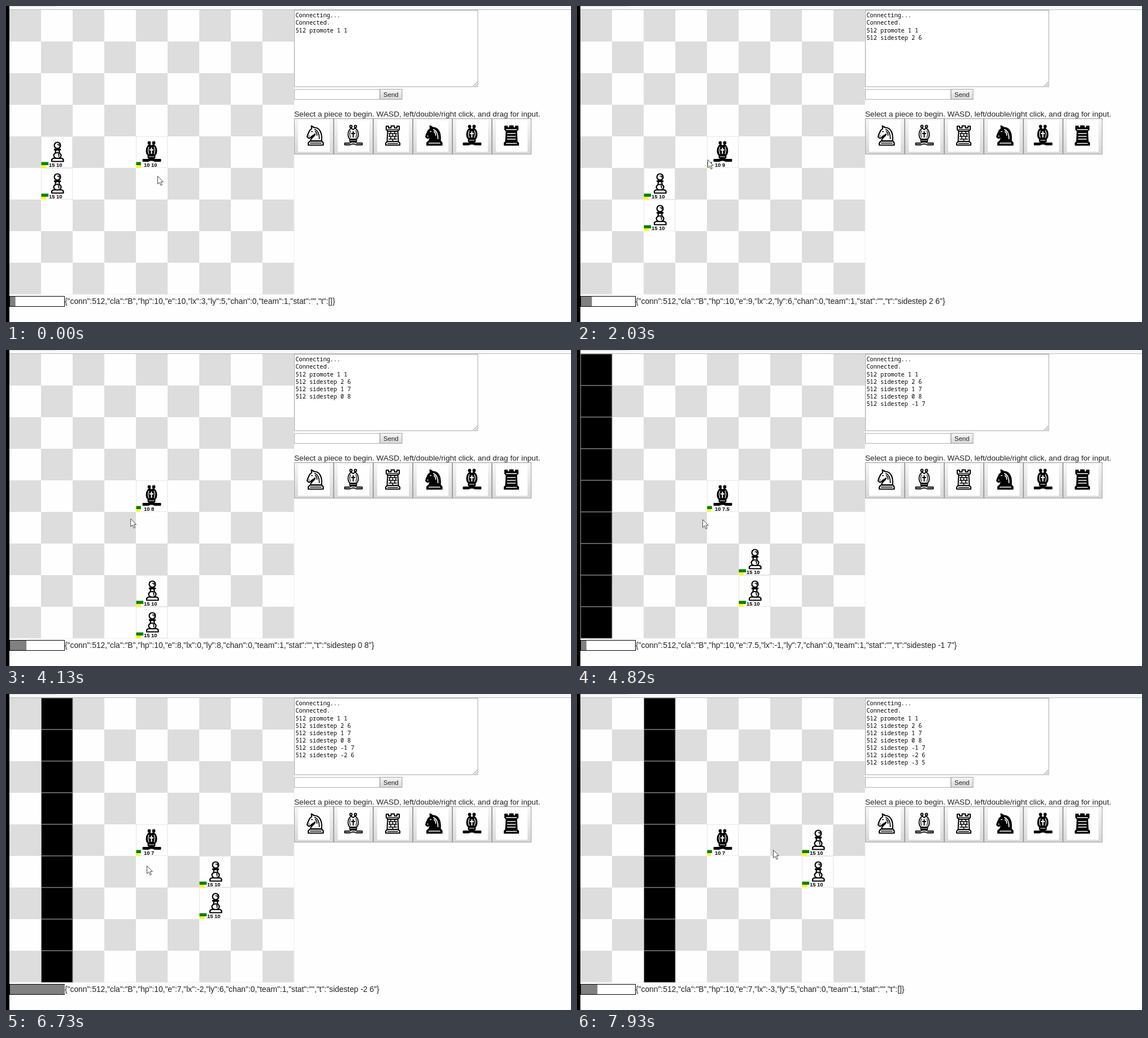
An HTML page that plays this animation: 1000 px wide and 560 px high, repeating every 8000 ms.

```html
<!DOCTYPE html>
<html lang="en">
<head>
<meta charset="utf-8">
<title>Chess arena</title>
<style>
  html, body { margin: 0; width: 100%; height: 100%; overflow: hidden; background: #fefefe; }
  svg { display: block; width: 1000px; height: 560px; }
  text { font-family: "Liberation Sans", Arial, sans-serif; fill: #222; }
  .mono { font: 500 10.2px "Noto Sans Mono", "DejaVu Sans Mono", monospace; fill: #000; }
  .body { font-size: 13.82px; }
  .stat { font-size: 9.4px; font-weight: bold; fill: #000; }
</style>
</head>
<body>
<svg viewBox="0 0 1000 560">
  <defs>
    <linearGradient id="face" x2="0" y2="1">
      <stop stop-color="#f6f6f6"/><stop offset="1" stop-color="#d8d8d8"/>
    </linearGradient>
    <g id="pawn" fill="#fff" stroke="#000" stroke-width="2.2" stroke-linejoin="round">
      <path d="M26 24L25 33H33L32 24Z"/>
      <ellipse cx="29" cy="34" rx="6.500" ry="5"/>
      <path d="M24.500 23.500H33.500" stroke-width="3.500" stroke-linecap="round"/>
      <circle cx="29" cy="16" r="5.500"/>
      <path d="M28.500 14.500H32V17.500" fill="none" stroke-width="1.600"/>
      <path d="M30 31Q33 33 31 36" fill="none" stroke-width="1.600"/>
      <path d="M19 44.500V41Q22 37.500 25 39H33Q37 37.500 39.500 41V44.500Z"/>
    </g>
    <g id="bishop" stroke="#000" stroke-width="1.8" stroke-linejoin="round">
      <circle cx="23.500" cy="11.500" r="2"/><circle cx="31.500" cy="11.500" r="2"/>
      <path d="M22 34C17 30 17 19 24 14.500L27.500 17 31 14.500C38 19 38 30 33 34Z"/>
      <path d="M21.500 34.500H33.500V38H21.500Z"/>
      <path d="M12.500 41H21L25 39H30L34 41H43.500V44H33L29 42.500H26L22 44H12.500Z"/>
    </g>
    <g id="bishop-lines" fill="none">
      <path d="M27.500 20V31M24 24H31" stroke-width="2"/>
      <path d="M23 18.500Q20 25 23 31.500M32 18.500Q35 25 32 31.500M23 36H32" stroke-width="1.200"/>
    </g>
    <g id="rook" stroke="#000" stroke-width="2" stroke-linejoin="round">
      <path d="M18.500 20H36.500L37.500 38H17.500Z"/>
      <path d="M16 11H20V14H24.500V10.500H30.500V14H35V11H39V17L36 20H19L16 17Z"/>
      <path d="M15 44.500V41L18 38H37L40 41V44.500Z"/>
    </g>
    <path id="courses" d="M18 17H37M20 24H35M20 29H35M20 34H35M18 41.500H37" fill="none" stroke-width="1.600"/>
    <g id="bricks">
      <use href="#courses"/>
      <path d="M24 20V24M31 20V24M27.500 24V29M22 24V29M33 24V29M24 29V34M31 29V34M27.500 34V38" stroke-width="1.600"/>
    </g>
    <g id="knight" stroke="#000" stroke-width="2.100" stroke-linejoin="round">
      <path d="M22 37C22 31 30 29 30 25C27 28 24 28 22.500 31L19 32.500 16 30 17 26 20.500 18.500 24 15.500 23.500 10.500 28.500 13.500C38 13 43 23 41.500 37Z"/>
      <path d="M18 44.500V40.500L21 37.500H42L44.500 40.500V44.500Z"/>
    </g>
    <path id="mane" d="M23 20.500H26M18.500 28.500H20.500M29 16.500Q38 20 37.500 34M30 20Q34 23 33.500 28M21 41H41.500" fill="none" stroke-width="1.600"/>
  </defs>
  <rect width="1000" height="560" fill="#fefefe"/>
  <rect width="1000" height="6" fill="#f8f8f8"/>
  <path d="M0 .5H90" stroke="#ddd"/>
  <path d="M0 6.500H1000" stroke="#bbb"/>
  <rect width="6" height="560"/>
  <g id="board"></g>
  <g id="panel"></g>
  <g id="live"></g>
</svg>
<script>
const LOOP = 8000, CELL = 56, LEFT = 6, TOP = 7;
const $ = id => document.getElementById(id);
const rect = (x, y, w, h, fill, extra = "") =>
  `<rect x="${x}" y="${y}" width="${w}" height="${h}" fill="${fill}" ${extra}/>`;
const text = (x, y, cls, s, extra = "") => `<text x="${x}" y="${y}" class="${cls}" ${extra}>${s}</text>`;
const frame = color => `stroke="${color}"`;

function sprite(kind, dark) {
  if (kind === "pawn") return '<use href="#pawn"/>';
  const [fill, line] = dark ? ["#000", "#fff"] : ["#fff", "#000"];
  const details = { bishop: "bishop-lines", rook: dark ? "courses" : "bricks", knight: "mane" };
  return `<use href="#${kind}" fill="${fill}"/><use href="#${details[kind]}" stroke="${line}"/>`;
}

function drawBoard() {
  let out = "";
  for (let i = 0; i < 81; i += 2)
    out += rect(LEFT + i % 9 * CELL, TOP + Math.floor(i / 9) * CELL, CELL, CELL, "#ddd");
  $("board").innerHTML = out + '<path d="M510 7V511H6" fill="none" stroke="#eee"/>';
}

function drawPanel() {
  let out = rect(510.5, 7.5, 324.5, 135.5, "#fff", frame("#a5a5a5"))
    + '<path d="M827 142L834 135M831 142L834 139" stroke="#777"/>'
    + rect(510.5, 148, 151, 17.5, "#fff", frame("#b0b0b0"))
    + rect(662, 147.5, 39, 18, "url(#face)", frame("#a0a0a0"))
    + text(681.3, 161, "", "Send", 'font-size="11.3" text-anchor="middle"')
    + text(510, 196, "", "Select a piece to begin. WASD, left/double/right click, and drag for input.", 'font-size="13.65"');
  ["knight", "bishop", "rook", "knight", "bishop", "rook"].forEach((kind, i) => {
    const x = 510 + 70 * i;
    out += rect(x + .5, 199.5, 69, 63, "url(#face)", frame("#a0a0a0"))
      + rect(x + 7, 202.5, CELL, CELL, "#fefefe")
      + `<g transform="translate(${x + 7} 202)">${sprite(kind, i > 2)}</g>`;
  });
  $("panel").innerHTML = out;
}

// Screen refreshes come in bursts of eight.
const bursts = [[130, 1090], [1220, 2150], [2290, 3250], [3410, 4400],
  [4560, 5470], [5610, 6570], [6730, 7660], [7780, 8830]];
function stepAt(t) {
  const i = bursts.findLastIndex(([start]) => t >= start);
  if (i < 0) return 0;
  const [start, end] = bursts[i];
  return 8 * i + 1 + Math.min(7, Math.floor((t - start + 18) * 7 / (end - start)));
}

function along(knots, s) {
  const i = Math.max(1, knots.findIndex(k => k[0] >= s));
  const a = knots[i - 1], b = knots[i], u = (s - a[0]) / (b[0] - a[0]);
  return a.slice(1).map((v, j) => v + (b[j + 1] - v) * u);
}
const clock = [[0, .5], [15, 21.3], [24, 34.05], [28, 39.7], [35, 50.05], [42, 59.9], [49, 69.9], [60, 85]];
const pointer = [[0, 268, 301], [9, 268, 301], [15, 231, 272], [24, 218, 297],
  [35, 222, 300], [42, 233, 303], [49, 249, 304], [58, 347, 276], [60, 347, 276]];

// One entry per turn: x, y, energy.
const turns = [[3, 5, 10], [3, 5, 10], [2, 6, 9], [1, 7, 8.5], [0, 8, 8],
  [-1, 7, 7.5], [-2, 6, 7], [-3, 5, 6.5], [-3, 5, 7]];
const moved = turn => turn > 1 && turn < 8;
const sidestep = ([x, y]) => `sidestep ${x} ${y}`;

function unit(col, row, kind, hp, energy) {
  return `<g transform="translate(${LEFT + col * CELL} ${TOP + row * CELL})">`
    + rect(.5, .5, 55, 55, "#fefefe", frame("#e6e6e6")) + sprite(kind, true)
    + rect(.5, 45.5, hp * .84, 5.5, "#008000") + rect(.5, 51, energy * .84, 4.5, "#ff0")
    + text(14, 54, "stat", `${hp} ${energy}`) + "</g>";
}

function render(step) {
  const tick = Math.floor(along(clock, step)[0]);
  const turn = Math.min(8, Math.floor(tick / 10));
  const [lx, ly, e] = turns[turn];
  let out = "";

  const edge = -1 - lx;
  if (edge >= 0)
    for (let row = 0; row < 9; row++)
      out += rect(LEFT + edge * CELL + .5, TOP + row * CELL, CELL - .5, CELL, "#000", frame("#999"));

  for (const wy of [5, 4]) out += unit(4 - lx, 4 + ly - wy, "pawn", 15, 10);
  out += unit(4, 4, "bishop", 10, e);

  const log = ["Connecting...", "Connected.", "512 promote 1 1"];
  turns.forEach((pos, i) => { if (i <= turn && moved(i)) log.push("512 " + sidestep(pos)); });
  log.forEach((line, i) => { out += text(512.5, 20.3 + 13.1 * i, "mono", line); });

  const info = { conn: 512, cla: "B", hp: 10, e, lx, ly, chan: 0, team: 1, stat: "",
    t: moved(turn) ? sidestep(turns[turn]) : [] };
  out += rect(6.5, 514.5, 97, 18, "#fff", frame("#000"))
    + rect(7, 515, 9.7 * (tick % 10 + 1), 17, "#808080")
    + text(104, 528, "body", JSON.stringify(info));

  const [px, py] = along(pointer, step);
  out += `<path transform="translate(${px.toFixed(1)} ${py.toFixed(1)})"
    d="M.5 .5V14.500L3.800 11.500 6 17 8.300 16 6 10.700H10.300Z" fill="#fff" stroke="#445" stroke-linejoin="round"/>`;
  $("live").innerHTML = out;
}

let shown = -1;
function play(now) {
  const step = stepAt(Math.max(0, now - begin) % LOOP);
  if (step !== shown) render(shown = step);
  requestAnimationFrame(play);
}

drawBoard();
drawPanel();
const begin = performance.now();
play(begin);
</script>
</body>
</html>
```
